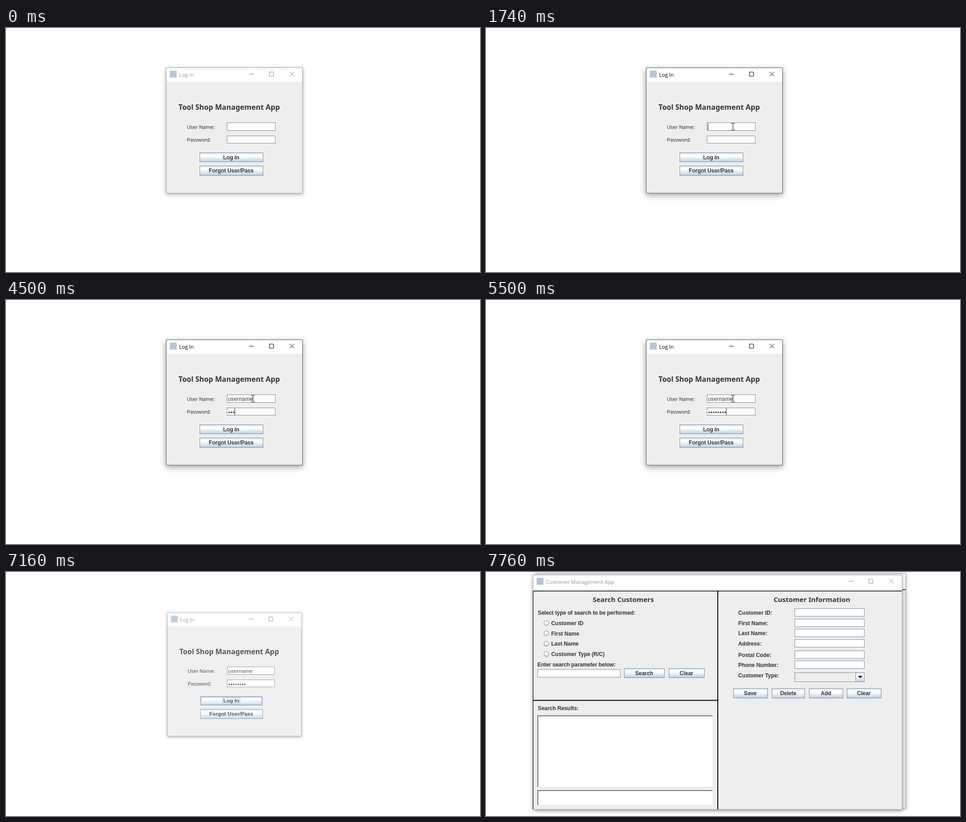
Write an HTML page that moves like this. It is 1043 px wide and 537 px high and loops after 7990 ms.

```html
<!DOCTYPE html>
<html lang="en">
<head>
<meta charset="utf-8">
<title>Log in</title>
<style>
html, body { margin: 0; width: 100%; height: 100%; overflow: hidden; background: #fff; }
svg { display: block; }
text { white-space: pre; fill: #333; font: 12px "Liberation Sans", Arial, sans-serif; }
.b { font-weight: bold; letter-spacing: -.05px; }
.tight { letter-spacing: -.11px; }
.label { font: 11.5px "Noto Sans", sans-serif; letter-spacing: -.3px; }
.head { font: bold 16px "Noto Sans", sans-serif; }
.sub { font: bold 15px "Noto Sans", sans-serif; }
.title { font: 11.4px "Open Sans", sans-serif; fill: #000; }
.mid { text-anchor: middle; }
.frame { fill: #eee; stroke: #5c5c5c; filter: drop-shadow(0 4px 7px rgba(0,0,0,.38)); }
.ctl { fill: none; stroke: #000; }
.off .frame { stroke: #a6a6a6; filter: drop-shadow(0 2px 4px rgba(0,0,0,.34)); }
.off .title { fill: #949494; }
.off .ctl { stroke: #8a8a8a; }
.field { fill: #fff; stroke: #7a8a99; }
.face { fill: url(#ocean); stroke: #7a8a99; }
.ring, .focus { fill: none; visibility: hidden; }
.hover .ring, .focused .focus { visibility: visible; }
.pressed .face { fill: #b8cfe5; }
</style>
</head>
<body>
<svg id="stage" width="1043" height="537" viewBox="0 0 1043 537">
<defs>
<linearGradient id="ocean" x1="0" y1="0" x2="0" y2="1">
<stop offset="0" stop-color="#dde8f3"/><stop offset=".3" stop-color="#fff"/>
<stop offset=".4" stop-color="#fff"/><stop offset="1" stop-color="#b8cfe5"/>
</linearGradient>
</defs>
</svg>
<script>
const LOOP = 7990;
const stage = document.getElementById('stage');

const rect = (x, y, w, h, attrs) =>
  `<rect x="${x}" y="${y}" width="${w}" height="${h}" ${attrs}/>`;
const line = (x, y, w, h) => rect(x, y, w, h, 'fill="#000"');
const text = (x, y, s, cls) => `<text x="${x}" y="${y}" class="${cls}">${s}</text>`;
// Outlined boxes take the first and last pixel they cover.
const box = (x1, y1, x2, y2, attrs) => rect(x1 + .5, y1 + .5, x2 - x1, y2 - y1, attrs);
const field = (x1, y1, x2, y2) => box(x1, y1, x2, y2, 'class="field"');

function button(x1, y1, x2, y2, label, id = '') {
  const mid = (x1 + x2) / 2, half = label.length * 3.2;
  const ring = (d, color) =>
    box(x1 + d, y1 + d, x2 - d, y2 - d, `class="ring" stroke="${color}"`);
  return `<g id="${id}">` + box(x1, y1, x2, y2, 'class="face"') +
    ring(0, '#b8cfe5') + ring(1, '#7a8a99') + ring(2, '#b8cfe5') +
    rect(mid - half - .5, y1 + 3.5, half * 2 + 1, y2 - y1 - 6, 'class="focus" stroke="#a3b8cc"') +
    text(mid, y1 + 14.5, label, 'b mid') + '</g>';
}

function frame(x1, y1, x2, y2, title, bar) {
  const y = y1 + 14.5;
  return box(x1, y1, x2, y2, 'class="frame"') +
    rect(x1 + 1, y1 + 1, x2 - x1 - 1, bar, 'fill="#fff"') +
    rect(x1 + 8.5, y1 + 7, 15, 15, 'fill="#b3c5d8"') +
    text(x1 + 29, y1 + 19.5, title, 'title') +
    `<path class="ctl" d="M${x2 - 117} ${y}h10 M${x2 - 72.5} ${y - 4.5}h9v9h-9z
      M${x2 - 28} ${y - 5}l10 10m0-10l-10 10"/>`;
}

const login = `<g id="login">` +
  frame(352, 87, 652, 363, 'Log In', 30) +
  text(379.5, 180, 'Tool Shop Management App', 'head') +
  text(398, 221.5, 'User Name:', 'label') +
  text(398, 250, 'Password:', 'label') +
  field(486, 208, 592, 225) + field(486, 237, 592, 253) +
  '<text id="user" x="488.5" y="222" letter-spacing=".2"></text>' +
  '<text id="pass" x="489" y="251.5" letter-spacing=".8"></text>' +
  button(426, 274, 565, 294, 'Log In', 'enter') +
  button(426, 303, 565, 324, 'Forgot User/Pass', 'forgot') +
  rect(0, 0, 1, 15, 'id="caret" fill="#222"') + '</g>';

const radios = ['Customer ID', 'First Name', 'Last Name', 'Customer Type (R/C)'];
const info = [['Customer ID:', 89], ['First Name:', 112], ['Last Name:', 134],
  ['Address:', 157], ['Postal Code:', 182], ['Phone Number:', 204]];
const actions = [['Save', 544, 619], ['Delete', 629, 701], ['Add', 711, 785], ['Clear', 794, 869]];
const sunken = (x1, y1, x2, y2) => rect(x1, y1, x2 - x1, y2 - y1, 'fill="#fff"') +
  `<path d="M${x1 + 1} ${y2}V${y1 + 1}H${x2}" fill="none" stroke="#737373" stroke-width="2"/>` +
  `<path d="M${x1} ${y2 - .5}H${x2 - .5}V${y1}" fill="none" stroke="#e3e3e3"/>`;

const customers = `<g id="customers" class="off">` +
  box(110, 3, 923, 519, 'class="frame"') +
  rect(111, 4, 812, 34, 'fill="#fff"') + line(111, 38, 812, 1.5) +
  frame(103, 6, 915, 522, 'Customer Management App', 34) +
  line(103, 41, 812, 1.5) + line(103, 41, 1.2, 481) +
  line(509, 41, 2, 481) + line(103, 281.5, 407, 2) +
  text(302, 66, 'Search Customers', 'sub mid') +
  text(114, 94, 'Select type of search to be performed:', 'b tight') +
  radios.map((s, i) => {
    const y = 112.5 + i * 22.7;
    return `<circle cx="133" cy="${y}" r="5.5" class="face"/>` + text(143.5, y + 4.5, s, 'b');
  }).join('') +
  text(113, 208, 'Enter search parameter below:', 'b tight') +
  field(113, 214, 295, 231) +
  button(304, 212, 392, 232, 'Search') + button(402, 212, 480, 232, 'Clear') +
  text(114, 303.5, 'Search Results:', 'b') +
  sunken(113, 315.5, 499.5, 474) + sunken(113, 480, 499.5, 514) +
  text(717, 66, 'Customer Information', 'sub mid') +
  info.map(([s, y]) => text(555, y + 4.5, s, 'b') + field(679, y - 9, 832, y + 8)).join('') +
  text(555, 231.5, 'Customer Type:', 'b') +
  box(679, 221, 832, 241, 'fill="#eee" stroke="#7a8a99"') +
  box(813, 221, 832, 241, 'class="face"') +
  '<path d="M818 228.5h11l-5.500 5.500z" fill="#222"/>' +
  actions.map(([s, a, b]) => button(a, 256, b, 277, s)).join('') + '</g>';

const cursors =
  `<path id="arrow" d="M.5 .5V16.500L4.200 13L6.700 18.700L9.200 17.600L6.800 12.100H11.800Z"
    fill="#fff" stroke="#000"/>` +
  `<path id="beam" d="M-3 -7.500h2.500l1 1l1-1h2.500 M.5 -7v14 M-3 7.500h2.500l1-1l1 1h2.500"
    fill="none" stroke="#000"/>`;

stage.insertAdjacentHTML('beforeend', login + customers + cursors);
const el = {};
for (const id of ['login', 'customers', 'user', 'pass', 'caret', 'enter', 'forgot', 'arrow', 'beam'])
  el[id] = document.getElementById(id);

const userKeys = [1910, 1990, 2200, 2380, 2610, 2760, 2930, 3000];
const passKeys = [4100, 4250, 4500, 4660, 5120, 5200, 5350, 5500];
const userCaret = [0, 7, 13, 20, 24, 31, 38, 48, 55];
const FOCUS = 820, TAB = 3320, PRESS = 6850, RELEASE = 7080, CLOSE = 7160, OPEN = 7760;
const BLINK = 460;
const caretResets = [FOCUS, ...userKeys, TAB, ...passKeys, 5590];

// time, x, y
const path = [
  [100, 850, 459], [260, 785, 402], [420, 660, 302], [580, 570, 231], [680, 543, 217],
  [6060, 543, 217], [6130, 600, 225], [6220, 600, 225], [6330, 556, 262], [6450, 460, 317],
  [6610, 460, 317], [6780, 464, 290], [6840, 466, 287]
];

function pointer(t) {
  const i = path.findIndex(p => p[0] > t);
  if (i < 0) return path[path.length - 1].slice(1);
  if (i === 0) return path[0].slice(1);
  const [t0, x0, y0] = path[i - 1], [t1, x1, y1] = path[i];
  const k = (t - t0) / (t1 - t0);
  return [x0 + (x1 - x0) * k, y0 + (y1 - y0) * k];
}

const count = (times, t) => times.filter(k => k <= t).length;
const show = (node, on) => { node.style.visibility = on ? 'visible' : 'hidden'; };

function render(t) {
  const typed = count(userKeys, t), dots = count(passKeys, t);
  el.user.textContent = 'username'.slice(0, typed);
  el.pass.textContent = '•'.repeat(dots);

  const resets = count(caretResets, t);
  const lit = resets > 0 && Math.floor((t - caretResets[resets - 1]) / BLINK) % 2 === 0;
  const inPass = t >= TAB;
  el.caret.setAttribute('x', 488 + (inPass ? dots * 5 : userCaret[typed]));
  el.caret.setAttribute('y', inPass ? 238 : 210);
  show(el.caret, lit && t < PRESS);

  const [x, y] = pointer(t).map(Math.round);
  const over = (x1, y1, x2, y2) => x >= x1 && x <= x2 && y >= y1 && y <= y2;
  const onField = over(486, 208, 592, 225) || over(486, 237, 592, 253);
  const visible = t >= 100 && t < CLOSE;
  show(el.arrow, visible && !onField);
  show(el.beam, visible && onField);
  for (const c of [el.arrow, el.beam]) c.setAttribute('transform', `translate(${x} ${y})`);

  const pressed = t >= PRESS && t < RELEASE;
  el.forgot.classList.toggle('hover', over(426, 303, 565, 324));
  el.enter.classList.toggle('hover', over(426, 274, 565, 294) && !pressed);
  el.enter.classList.toggle('pressed', pressed);
  el.enter.classList.toggle('focused', t >= PRESS);

  el.login.classList.toggle('off', t < FOCUS || t >= CLOSE);
  const gone = Math.min(1, Math.max(0, (t - CLOSE + 40) / 240));
  const scale = 1 - .1 * gone;
  el.login.setAttribute('transform',
    gone ? `translate(502 225) scale(${scale}) translate(-502 -225)` : '');
  el.login.style.opacity = 1 - gone;
  el.login.style.display = gone < 1 ? '' : 'none';
  el.customers.style.display = t >= OPEN ? '' : 'none';
}

const start = performance.now();
function tick() {
  render((performance.now() - start) % LOOP);
  requestAnimationFrame(tick);
}
tick();
</script>
</body>
</html>
```
